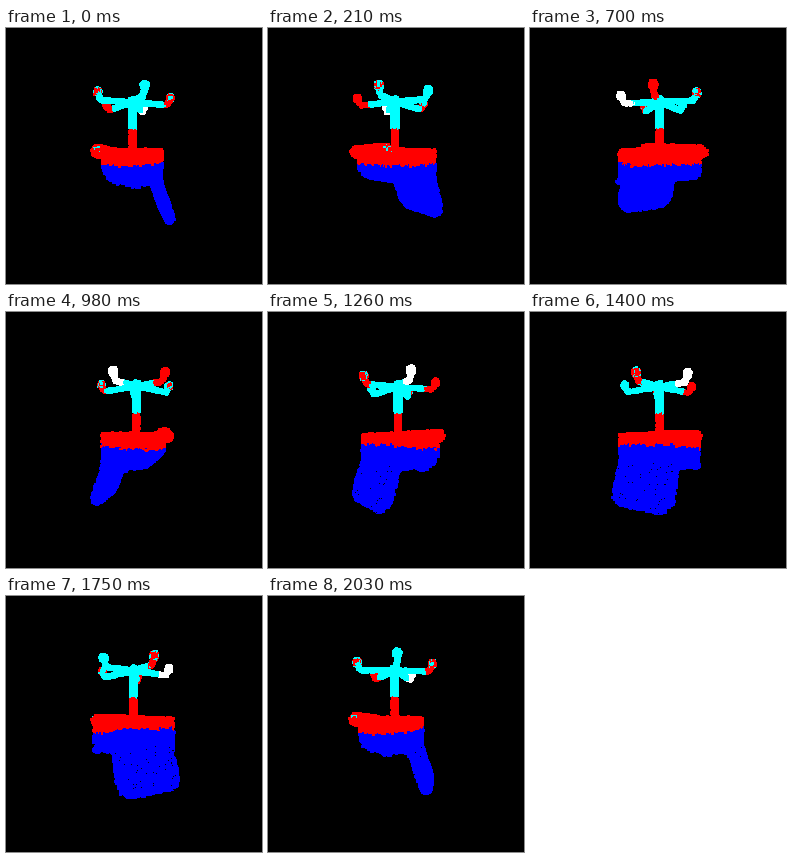
These frames come from a looping animation (256 px wide and 256 px high, 2.1 s). An HTML page with a canvas:

```html
<!DOCTYPE html>
<html lang="en">
<head>
<meta charset="utf-8">
<title>Turning chair point cloud</title>
<style>
  html, body { margin: 0; width: 100%; height: 100%; overflow: hidden; background: #000; }
  canvas { display: block; }
</style>
</head>
<body>
<canvas id="stage" width="256" height="256"></canvas>
<script>
const ctx = document.getElementById('stage').getContext('2d');
const RED = '#f00', BLUE = '#00f', CYAN = '#0ff', WHITE = '#fff', BLACK = '#000';
const STEP = 70, STEPS = 30, DISTANCE = 200;

let seed = 7;
const rand = () => {
  seed = (seed * 1664525 + 1013904223) % 4294967296;
  return seed / 4294967296;
};
const spread = a => (rand() * 2 - 1) * a;

// Model axes: x towards the backrest, y down the screen, z sideways
const points = [];
const add = (x, y, z, color, size = 3) => points.push({ x, y, z, color, size });

function onSphere(r) {
  const h = spread(1), a = rand() * 2 * Math.PI, w = Math.sqrt(1 - h * h);
  return [r * w * Math.cos(a), r * h, r * w * Math.sin(a)];
}

// paint: a colour, or a function of the position 0..1 along the rod
function rod(from, to, r, count, paint) {
  for (let i = 0; i < count; i++) {
    const u = rand(), o = onSphere(r);
    const p = from.map((v, k) => v + (to[k] - v) * u + o[k]);
    add(...p, typeof paint === 'function' ? paint(u) : paint);
  }
}

function seat() {
  for (let i = 0; i < 14000; i++) {
    const x = spread(27), z = spread(36);
    if ((x / 27) ** 6 + (z / 36) ** 6 > 1) continue;
    const bottom = 24 - 14 * (Math.max(0, -8 - x) / 19) ** 2;
    const y = -6.5 + rand() * (bottom + 6.5);
    const edge = 7.5 - 4 * (Math.max(0, x) / 27) ** 2;
    add(x - 2, y, z, y < edge + spread(1.2) ? RED : BLUE);
  }
  rod([-31, -4.5, -29], [-31, -4.5, 29], 5.5, 1600, RED);
  for (const side of [-1, 1]) rod([-2, 22.5, side * 39.5], [4, 22.5, side * 39.5], 2.3, 100, BLUE);
  rod([-33, -7, 30], [-27, -6, 31], 2, 9, CYAN);
}

function backrest() {
  for (let i = 0; i < 14000; i++) {
    const v = rand(), o = onSphere(4);
    const t = Math.max(0, v - 0.75) / 0.25;
    const half = 28.3 - 9 * (1 - Math.sqrt(1 - t * t));
    const speck = o[0] > 2.5 && rand() < 0.04;
    add(18 + 13.5 * v + o[0] + (speck ? 1 : 0), 18 + 38.2 * v + o[1],
        1 + spread(half) + o[2], speck ? BLACK : BLUE, speck ? 1 : 3);
  }
}

function base() {
  rod([-2, -57, 0], [-2, -29, 0], 3.3, 700, CYAN);
  rod([-2, -26, 0], [-2, -7, 0], 2.7, 450, RED);
  const legs = [
    { angle: 16, wheel: CYAN, from: 1 },
    { angle: 88, wheel: RED, from: 0.95, fleck: 0.4 },
    { angle: 160, wheel: WHITE, from: 0.75 },
    { angle: 232, wheel: RED, from: 0.75 },
    { angle: 304, wheel: CYAN, from: 1, fleck: 0.35 }
  ];
  for (const { angle, wheel, from, fleck = 0 } of legs) {
    const a = angle * Math.PI / 180;
    const at = (r, y) => [r * Math.sin(a) - 2, y, r * Math.cos(a)];
    const other = wheel === RED ? CYAN : RED;
    rod(at(2, -54), at(34, -51), 1.8, 420, u => u > from ? wheel : CYAN);
    rod(at(35, -52), at(37, -57), 1.7, 120, wheel);
    rod(at(37.5, -58.5), at(37.5, -57.5), 3.1, 140, () => rand() < fleck ? other : wheel);
  }
}

seat();
backrest();
base();

function draw(step) {
  const a = step / STEPS * 2 * Math.PI, c = Math.cos(a), s = Math.sin(a);
  for (const p of points) {
    p.depth = p.z * c - p.x * s;
    const scale = DISTANCE / (DISTANCE - p.depth), off = p.size >> 1;
    p.sx = Math.round(128 + (p.x * c + p.z * s) * scale) - off;
    p.sy = Math.round(128 + p.y * scale) - off;
  }
  points.sort((p, q) => p.depth - q.depth);
  ctx.fillStyle = BLACK;
  ctx.fillRect(0, 0, 256, 256);
  for (const p of points) {
    ctx.fillStyle = p.color;
    ctx.fillRect(p.sx, p.sy, p.size, p.size);
  }
}

const start = performance.now();
let shown = -1;
function tick() {
  const step = Math.floor((performance.now() - start) / STEP) % STEPS;
  if (step !== shown) draw(shown = step);
  requestAnimationFrame(tick);
}
tick();
</script>
</body>
</html>
```
